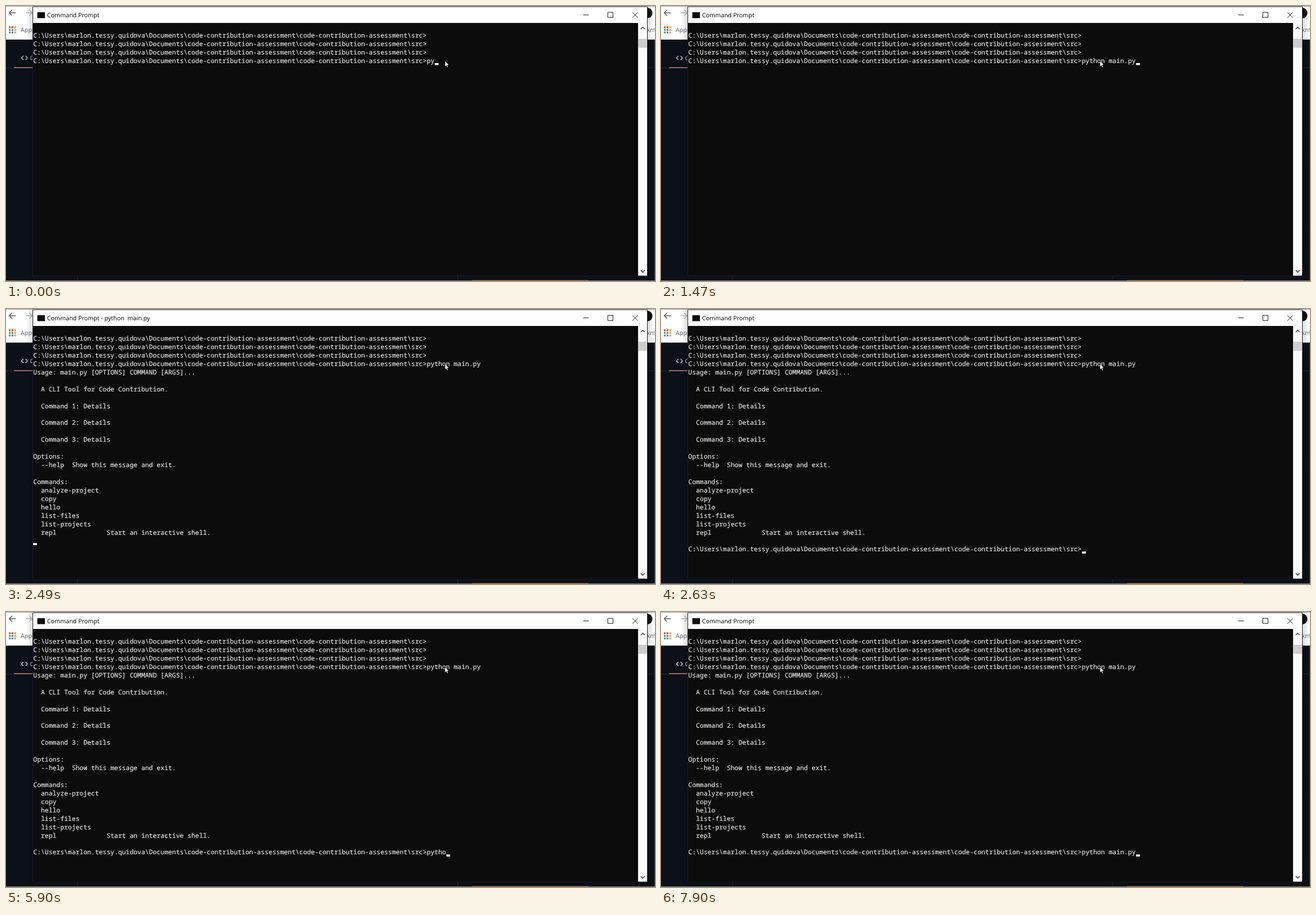
These frames come from a looping animation (1150x487 px, 8000 ms). An HTML page:

```html
<!DOCTYPE html>
<html lang="en">
<head>
<meta charset="utf-8">
<title>Terminal session</title>
<style>
  html, body { margin: 0; width: 100%; height: 100%; overflow: hidden; background: #0c1018; }
  svg { display: block; width: 100%; height: 100%; }
  text { white-space: pre; text-rendering: geometricPrecision; }
  .mono { font: 11.405px "Noto Sans Mono", "DejaVu Sans Mono", monospace; fill: #e6e6e6; stroke: #e6e6e6; stroke-width: .18; }
  .ui { font: 10.75px "Open Sans", "Noto Sans", sans-serif; fill: #000; }
  .bar { fill: #5f6368; }
  .line { fill: none; stroke: #111; stroke-width: 1; }
</style>
</head>
<body>
<svg viewBox="0 0 1150 487" preserveAspectRatio="none">
  <defs>
    <linearGradient id="shadeL"><stop offset="0" stop-opacity="0"/><stop offset="1" stop-opacity=".15"/></linearGradient>
    <linearGradient id="shadeR"><stop offset="0" stop-opacity=".15"/><stop offset="1" stop-opacity="0"/></linearGradient>
  </defs>

  <!-- browser behind the window -->
  <rect width="1150" height="487" fill="#0c1018"/>
  <rect width="1150" height="59.5" fill="#fff"/>
  <g fill="none" stroke-width="1.4">
    <path d="M17.5 12H6M11 6.7L5.7 12L11 17.3" stroke="#55595d"/>
    <path d="M35 12H46M41 6.7L46.3 12L41 17.3" stroke="#b5b7b9"/>
  </g>
  <g id="apps"></g>
  <text class="ui bar" x="26" y="46">Apps</text>
  <text class="ui bar" x="1135.5" y="46">km</text>
  <circle cx="1136" cy="12.5" r="9.5" fill="#15110d"/>
  <path d="M0 109.5H48M1136 109.5H1150" stroke="#22272e"/>
  <path d="M31 88.3L27.3 92L31 95.7M34.5 88.3L38.2 92L34.5 95.7" fill="none" stroke="#d5dae0" stroke-width="1.2"/>
  <text class="ui" x="42.5" y="95.8" style="fill:#d5dae0">Code</text>
  <rect x="14" y="108.6" width="34" height="1.4" fill="#d98f78"/>
  <path d="M126.5 478V486M800.5 478V486" stroke="#22272e"/>
  <rect x="36" width="12" height="487" fill="url(#shadeL)"/>
  <rect x="1136" width="12" height="487" fill="url(#shadeR)"/>
  <rect width="1150" height="1" fill="#a0a0a0"/>
  <rect x="1149" y="60" width="1" height="427" fill="#3a3f46"/>
  <rect y="486" width="1150" height="1" fill="#85888c"/>
  <rect x="826" y="485.6" width="206" height="1.4" fill="#b98a55"/>

  <!-- console window -->
  <rect x="47" y="1" width="1090" height="477.5" fill="#1b1d20"/>
  <rect x="47" y="1" width="1090" height="1" fill="#55585b"/>
  <rect x="48" y="2" width="1088" height="28" fill="#fff"/>
  <rect x="48" y="30" width="1072" height="447.5" fill="#0c0c0c"/>
  <rect x="1120" y="30" width="16" height="447.5" fill="#fafafa"/>
  <rect x="1120.5" y="58" width="15" height="16" fill="#cdcdcd"/>
  <path d="M1124.8 41L1128.3 37.5L1131.8 41M1124.8 468L1128.3 471.5L1131.8 468" fill="none" stroke="#505050" stroke-width="1.6"/>
  <rect x="55.5" y="11" width="13.5" height="10.5" fill="#0c0c0c"/>
  <text class="ui" id="title" x="72.7" y="20.4"></text>
  <path class="line" d="M1022.7 15.8H1032.7M1066.4 11.2H1075.6V20.3H1066.4ZM1110 11.3L1119.5 20.7M1119.5 11.3L1110 20.7"/>

  <g id="screen"></g>
  <rect id="caret" width="6.84" height="3.6" fill="#fff"/>
  <path d="M778 97.5V107.2L780.2 105.2L781.8 108.7L783.3 108L781.8 104.6H784.8Z" fill="#fff" stroke="#0c0c0c" stroke-width=".5"/>
</svg>
<script>
const LOOP = 8000, LEFT = 48, CELL = 6.843, ROW = 14.93, BASE = 56.15, CARET_Y = 56.2;
const PROMPT = 'C:\\Users\\marlon.tessy.quidova\\Documents\\code-contribution-assessment\\code-contribution-assessment\\src>';
const COMMAND = 'python main.py';
const OUTPUT = `Usage: main.py [OPTIONS] COMMAND [ARGS]...

  A CLI Tool for Code Contribution.

  Command 1: Details

  Command 2: Details

  Command 3: Details

Options:
  --help  Show this message and exit.

Commands:
  analyze-project
  copy
  hello
  list-files
  list-projects
  repl             Start an interactive shell.`.split('\n');

// [time, typed characters]
const FIRST = [[0, 2], [250, 4], [370, 5], [520, 6], [770, 8], [920, 10], [1040, 11], [1190, 12], [1470, 14]];
const SECOND = [[2630, 0], [5350, 1], [5660, 2], [5780, 4], [5900, 5], [6340, 6], [6730, 7],
  [7000, 8], [7260, 11], [7530, 12], [7780, 13], [7900, 14]];
const ENTER = 1930, RUN = 2060, PRINT = 2490, DONE = 2630;

const SVG = 'http://www.w3.org/2000/svg';
const $ = id => document.getElementById(id);
const hard = s => s.replace(/ /g, '\u00a0');

function add(parent, tag, attrs) {
  const el = document.createElementNS(SVG, tag);
  for (const k in attrs) el.setAttribute(k, attrs[k]);
  return parent.appendChild(el);
}

['#e5533d', '#e5533d', '#f0a030', '#4aa564', '#4285e8', '#f0a030', '#4aa564', '#4285e8', '#f0a030'].forEach((fill, i) =>
  add($('apps'), 'rect', { x: 5 + i % 3 * 4.8, y: 36 + Math.floor(i / 3) * 4.6, width: 3.3, height: 3.3, fill }));

const lines = Array.from({ length: 26 }, (_, i) =>
  add($('screen'), 'text', { class: 'mono', x: LEFT + 0.3, y: BASE + i * ROW }));

function setText(el, s) {
  s = hard(s);
  if (el.textContent !== s) el.textContent = s;
}

function typed(steps, t) {
  let n = 0;
  for (const [at, count] of steps) if (t >= at) n = count;
  return n;
}

function caretAt(t, n1, n2) {
  if (t < ENTER) return [3, PROMPT.length + n1];
  if (t < PRINT) return [4, 0];
  if (t < DONE) return [24, 0];
  return [25, PROMPT.length + n2];
}

function draw(t) {
  const n1 = typed(FIRST, t), n2 = typed(SECOND, t);
  lines.forEach((el, i) => {
    let s = '';
    if (i < 3) s = PROMPT;
    else if (i === 3) s = PROMPT + COMMAND.slice(0, n1);
    else if (i === 25) s = t >= DONE ? PROMPT + COMMAND.slice(0, n2) : '';
    else if (t >= PRINT) s = OUTPUT[i - 4] || '';
    setText(el, s);
  });
  setText($('title'), 'Command Prompt' + (t >= RUN && t < DONE ? ' - python  main.py' : ''));
  const [row, col] = caretAt(t, n1, n2);
  $('caret').setAttribute('x', LEFT + col * CELL);
  $('caret').setAttribute('y', CARET_Y + row * ROW);
}

const start = performance.now();
function tick() {
  draw((performance.now() - start) % LOOP);
  requestAnimationFrame(tick);
}
tick();
</script>
</body>
</html>
```
